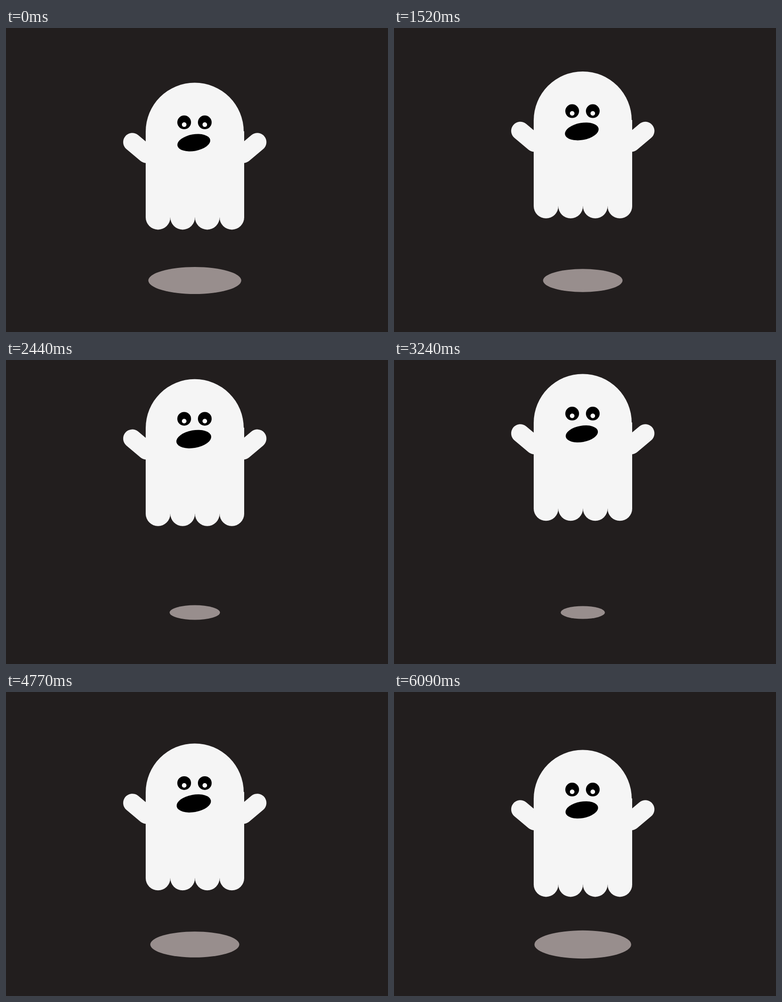
Write an HTML page with a canvas that moves like this. It is 834 px wide and 664 px high and loops after 6160 ms.

```html
<!DOCTYPE html>
<html lang="en">
<head>
<meta charset="utf-8">
<title>Floating ghost</title>
<style>
  html, body { margin: 0; width: 100%; height: 100%; overflow: hidden; background: #221e1e; }
  canvas { display: block; width: 834px; height: 664px; }
</style>
</head>
<body>
<canvas id="stage" width="834" height="664"></canvas>
<script>
const ctx = document.getElementById('stage').getContext('2d');
const LOOP = 6160, STEP = LOOP / 93;
const BG = '#221e1e', WHITE = '#f5f5f5', SHADOW = '#988e8d';
const MID = 412.2;

// cubic-bezier(.25, .1, .25, 1)
function ease(x) {
  let lo = 0, hi = 1;
  for (let i = 0; i < 24; i++) {
    const s = (lo + hi) / 2;
    if (0.75 * s * (1 - s) + s * s * s < x) lo = s; else hi = s;
  }
  const s = (lo + hi) / 2, r = 1 - s;
  return 0.3 * s * r * r + 3 * s * s * r + s * s * s;
}

// 0 to 1 and back, each half eased
function swing(time, period) {
  const x = (time % period) / period * 2;
  return x < 1 ? ease(x) : 1 - ease(x - 1);
}

function ellipse(x, y, rx, ry, color, turn = 0) {
  ctx.fillStyle = color;
  ctx.beginPath();
  ctx.ellipse(x, y, rx, ry, turn, 0, Math.PI * 2);
  ctx.fill();
}

function arm(side) {
  ctx.strokeStyle = WHITE;
  ctx.lineWidth = 40;
  ctx.lineCap = 'round';
  ctx.beginPath();
  ctx.moveTo(MID + side * 136.4, 129.8);
  ctx.lineTo(MID + side * 105.8, 155.5);
  ctx.stroke();
}

function body() {
  ellipse(412, 107, 107, 107, WHITE);
  ctx.fillRect(305, 106, 215, 188);
  for (let i = 0; i < 4; i++) ellipse(331.9 + i * 53.75, 294, 26.9, 26.9, WHITE);
}

function eye(x) {
  ellipse(x, 86.6, 15, 15, '#000');
  ellipse(x, 91.6, 5, 5, '#fff');
}

function draw(t) {
  const lift = swing(t + 4037, 5000);
  const open = 1 + 0.1 * swing(t + 2037, 3000);
  const spread = 1 - 0.555 * lift;

  ctx.fillStyle = BG;
  ctx.fillRect(0, 0, 834, 664);
  ellipse(MID, 551.5, 107.7 * spread, 31.3 * spread, SHADOW);

  ctx.save();
  ctx.translate(0, 130 - 100 * lift);
  arm(-1);
  arm(1);
  body();
  eye(389);
  eye(434);
  ellipse(410, 131, 35 * open, 17.5 * open, '#000', -Math.PI / 18);
  ctx.restore();
}

const start = performance.now();
function tick(now) {
  const t = Math.max(0, now - start) % LOOP;
  draw(Math.min(92, Math.floor((t + 12) / STEP)) * STEP);
  requestAnimationFrame(tick);
}
draw(0);
requestAnimationFrame(tick);
</script>
</body>
</html>
```
